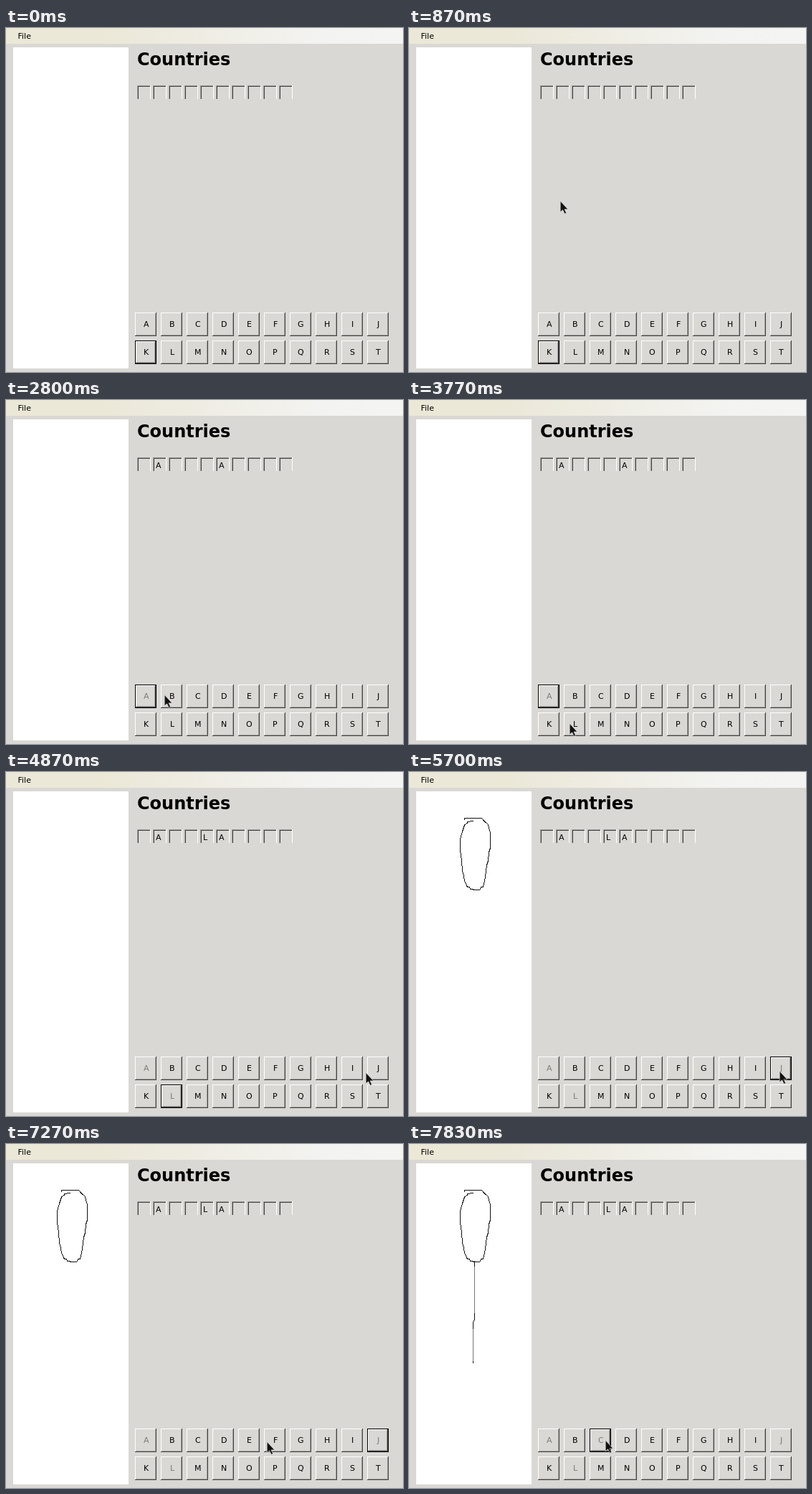
An HTML page for the animation above (8000 ms loop, 554 px wide and 480 px high).

```html
<!DOCTYPE html>
<html lang="en">
<head>
<meta charset="utf-8">
<title>Word game</title>
<style>
  html, body { margin: 0; width: 100%; height: 100%; overflow: hidden; background: #d9d8d4; }
  svg { display: block; width: 554px; height: 480px; font: 11px "DejaVu Sans", sans-serif; }
  .line { fill: none; stroke: #111; shape-rendering: crispEdges; }
  rect { shape-rendering: crispEdges; }
</style>
</head>
<body>
<svg id="stage" viewBox="0 0 554 480">
  <defs>
    <linearGradient id="bar">
      <stop offset="0" stop-color="#ebe8d7"/>
      <stop offset=".25" stop-color="#ebe8d8"/>
      <stop offset=".8" stop-color="#f3f3f1"/>
      <stop offset="1" stop-color="#f4f4f3"/>
    </linearGradient>
  </defs>
  <rect width="554" height="480" fill="#d9d8d4"/>
  <rect width="554" height="22" fill="url(#bar)"/>
  <text x="16.5" y="15">File</text>
  <rect x="10" y="27" width="161" height="448" fill="#fff"/>
  <text x="183" y="52" font-size="24" font-weight="700">Countries</text>
  <g id="cells"></g>
  <g id="keys"></g>
  <path id="balloon" class="line" d="M77.5 67V64H101.5L104 67.5L110.5 73.5L111.5 78L113.5 85V106L111.5 112L110.5 124L108.5 130L106.5 146L105.5 152L103.5 160.5H101L98.5 164.5H89.5V163.5H85.5L84.5 160.5H81.5L77.5 152L76.5 145L74.5 138L73.5 123L71.5 110V94L74.5 83L77.5 74L81.5 71V69.5H84L86 68.5H90"/>
  <g id="string" class="line">
    <path d="M91.5 171V236M89.5 258V303" stroke="#777"/>
    <path d="M91.5 163V171M91.5 236V245L89.5 249V258M89.5 303V306"/>
  </g>
  <path id="cursor" d="M.2 -.5V14.8L3.6 11.8L6.2 17.2L8.6 16.2L6.1 10.9H10.8Z" fill="#111" stroke="#ecebe8" stroke-width=".6"/>
</svg>
<script>
const LOOP = 8000;
const $ = id => document.getElementById(id);

function add(parent, tag, attrs, text) {
  const el = document.createElementNS("http://www.w3.org/2000/svg", tag);
  for (const k in attrs) el.setAttribute(k, attrs[k]);
  if (text) el.textContent = text;
  parent.appendChild(el);
  return el;
}
const box = (g, x, y, width, height, fill) => add(g, "rect", { x, y, width, height, fill });
const show = (el, on) => el.setAttribute("visibility", on ? "visible" : "hidden");

// key, time pressed, time released, cells it fills
const clicks = [
  { key: "K", down: -2, up: Infinity, cells: [] },
  { key: "A", down: 2030, up: 2130, cells: [1, 5] },
  { key: "L", down: 3900, up: 4000, cells: [4] },
  { key: "J", down: 5450, up: 5550, cells: [] },
  { key: "C", down: 7730, up: 7830, cells: [] }
];

// time, x, y of the pointer tip
const path = [
  [30, 97, 34], [230, 188, 125], [530, 188, 125], [1330, 248, 426],
  [1570, 248, 426], [1950, 192, 413], [2230, 192, 413], [2800, 221, 412],
  [3000, 232, 414], [3300, 238, 420], [3530, 238, 420], [3770, 224, 452],
  [4080, 224, 452], [4370, 244, 447], [4870, 502, 420], [5100, 519, 417],
  [5700, 517, 418], [6800, 513, 417], [6835, 502, 418], [7600, 274, 414],
  [8000, 274, 414]
];

const letters = [];
for (let i = 0; i < 10; i++) {
  const x = 183 + 22 * i, g = $("cells");
  box(g, x, 80, 18, 1, "#a09f9b");
  box(g, x, 80, 1, 19, "#a09f9b");
  box(g, x + 1, 81, 17, 1, "#444");
  box(g, x + 1, 81, 1, 18, "#444");
  box(g, x + 18, 80, 1, 19, "#fff");
  letters.push(add(g, "text", { x: x + 4, y: 95 }));
}

function bevel(g, x, y, w, h, light, dark, soft) {
  box(g, x, y, w, 1, light);
  box(g, x, y, 1, h, light);
  box(g, x + 1, y + h - 2, w - 2, 1, soft);
  box(g, x + w - 2, y + 1, 1, h - 2, soft);
  box(g, x, y + h - 1, w, 1, dark);
  box(g, x + w - 1, y, 1, h, dark);
}

const keys = [..."ABCDEFGHIJKLMNOPQRST"].map((name, i) => {
  const x = 180 + 36 * (i % 10), y = i < 10 ? 397 : 436;
  const group = () => add($("keys"), "g", {});
  const idle = group(), focus = group(), sunk = group();
  bevel(idle, x, y, 30, 33, "#fff", "#444", "#a09f9b");
  box(focus, x, y, 30, 33, "#000");
  box(focus, x + 1, y + 1, 28, 31, "#d9d8d4");
  bevel(focus, x + 1, y + 1, 28, 31, "#fff", "#444", "#a09f9b");
  box(sunk, x, y, 30, 33, "#000");
  box(sunk, x + 1, y + 1, 28, 31, "#a09f9b");
  box(sunk, x + 2, y + 2, 26, 29, "#d9d8d4");
  const label = add($("keys"), "text", { y: y + 20 }, name);
  // labels are centred on whole pixels
  const width = Math.round(label.getComputedTextLength());
  label.setAttribute("x", Math.floor(x + 16 - width / 2));
  return { name, idle, focus, sunk, label };
});

function pointer(t) {
  const i = path.findIndex(p => p[0] > t);
  if (i < 0) return path[path.length - 1].slice(1);
  const [t0, x0, y0] = path[i - 1], [t1, x1, y1] = path[i];
  const u = (t - t0) / (t1 - t0), e = u * u * (3 - 2 * u);
  return [x0 + (x1 - x0) * e, y0 + (y1 - y0) * e].map(Math.round);
}

function draw(t) {
  const last = clicks.filter(c => t >= c.down).pop();
  for (const k of keys) {
    const click = clicks.find(c => c.key === k.name);
    const focused = last.key === k.name;
    const pressed = focused && last.down >= 0 && t < last.up;
    show(k.idle, !focused);
    show(k.focus, focused && !pressed);
    show(k.sunk, pressed);
    k.label.setAttribute("fill", click && t >= click.up ? "#7d7c79" : "#000");
    k.label.setAttribute("transform", pressed ? "translate(1 1)" : "");
  }
  letters.forEach((el, i) => {
    const hit = clicks.find(c => c.cells.includes(i) && t >= c.up);
    el.textContent = hit ? hit.key : "";
  });
  show($("balloon"), t >= 5550);
  show($("string"), t >= 7830);
  show($("cursor"), t >= 30);
  if (t >= 30) $("cursor").setAttribute("transform", `translate(${pointer(t)})`);
}

const start = performance.now();
function tick() {
  draw((performance.now() - start) % LOOP);
  requestAnimationFrame(tick);
}
draw(0);
requestAnimationFrame(tick);
</script>
</body>
</html>
```
